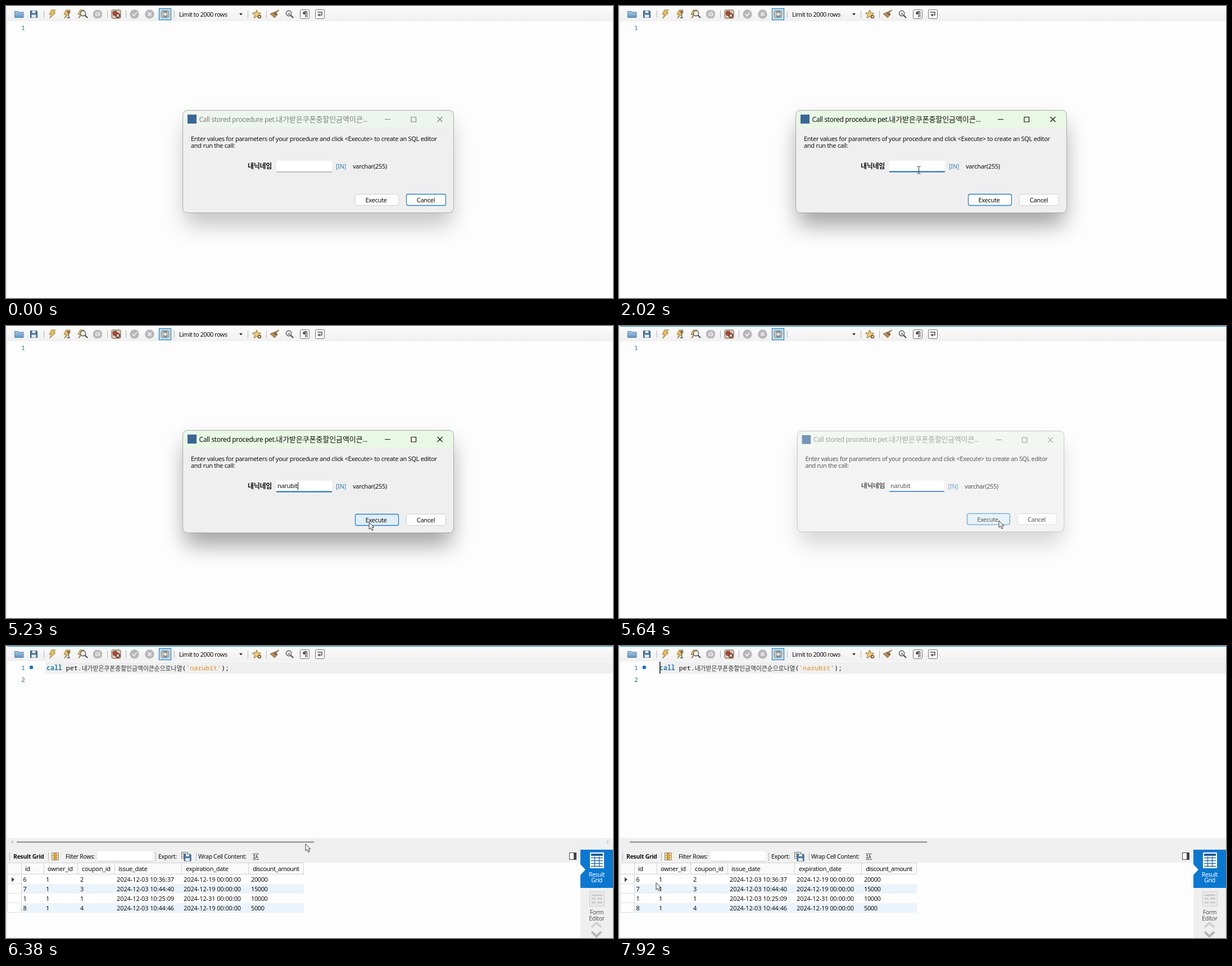
An HTML page that plays this animation: 1080x519 px, repeating every 7990 ms.

```html
<!DOCTYPE html>
<html lang="ko">
<head>
<meta charset="utf-8">
<title>Stored procedure call</title>
<style>
html, body { margin: 0; width: 100%; height: 100%; overflow: hidden; background: #fdfdfd; }
svg { display: block; width: 1080px; height: 519px; }
text { font: 11px "Noto Sans", "Noto Sans CJK KR", sans-serif; letter-spacing: -.3px; fill: #111; white-space: pre; }
.ko { font-family: "Noto Sans CJK KR", "Noto Sans CJK JP", sans-serif; }
.bar { font-size: 10.5px; letter-spacing: -.35px; }
.bold { font-weight: 700; }
.mid { text-anchor: middle; }
.mono, .mono tspan { font-family: "Noto Sans Mono", "Noto Sans CJK KR", monospace; font-size: 11.6px; letter-spacing: 0; }
.mono .ko { font-family: "Noto Sans CJK KR", sans-serif; font-size: 10.8px; fill: #333; }
.mono .word { fill: #287fae; }
.mono .str { fill: #dc8f1d; }
.row { fill: #2f6f9f; }
.num { letter-spacing: -.4px; }
.date { letter-spacing: -.1px; }
.sep { stroke: #b4b4b4; }
.line { fill: none; stroke: #555; }
</style>
</head>
<body>
<svg viewBox="0 0 1080 519">
  <defs>
    <linearGradient id="tool" x2="0" y2="1"><stop stop-color="#fcfcfc"/><stop offset="1" stop-color="#f0f0f0"/></linearGradient>
    <linearGradient id="blue" x2="0" y2="1"><stop stop-color="#a9cbe6"/><stop offset="1" stop-color="#5f93bd"/></linearGradient>
    <filter id="soft" x="-20%" y="-40%" width="140%" height="190%"><feGaussianBlur stdDeviation="19"/></filter>
    <path id="bolt" d="M5-7H-2L-6 1H-2L-5 8 5-2H1Z" fill="#efc15a" stroke="#8a6a35" stroke-width=".9"/>
    <g id="lens"><circle r="4.6" fill="#f4f4f4" stroke="#666" stroke-width="1.6"/><path d="M3.5 3.5 8 8" stroke="#555" stroke-width="2.4"/></g>
    <g id="disk"><path d="M-6-6H5L6-5V6H-6Z" fill="#47769f" stroke="#2f567a"/><path d="M-3-6H3V-2H-3ZM-4 1H4V6H-4Z" fill="#e6eef5"/></g>
    <rect id="key" x="-8" y="-8" width="16" height="16" rx="2" fill="#f7f7f7" stroke="#777"/>
  </defs>

  <rect width="2" height="519" fill="#ececec"/>
  <rect x="2" width="1078" height="27" fill="url(#tool)"/>
  <path id="focusLine" d="M2 .5H1080" stroke="#1583d2"/>
  <path class="sep" d="M67.5 8V21M180.5 8V21M213.5 8V21M299.5 8V21M430.5 8V21M463.5 8V21"/>
  <path d="M15.5 9.5H21L23 11H31V20.5H15.5Z" fill="url(#blue)" stroke="#5583a8"/>
  <use href="#disk" x="49.5" y="14.5"/>
  <use href="#bolt" x="83" y="14"/>
  <use href="#bolt" x="109" y="14"/><path d="M108 10H115M111.5 10V21M109 21H114" class="line" stroke-width="1.4"/>
  <use href="#bolt" x="134" y="14"/><use href="#lens" x="137" y="13"/>
  <path d="M159 7H167L171 11V18L167 22H159L155 18V11Z" fill="#b9b9b9"/><path d="M160 18V11M162.5 17V9.5M165 17V10M167 17V12M160 17H167" stroke="#e2e2e2" stroke-width="1.5"/>
  <rect x="188" y="7" width="16" height="15" rx="2" fill="#d8c9b4" stroke="#6e5c4d"/>
  <circle cx="194" cy="13" r="4" fill="#b54938" stroke="#703025"/><circle cx="199" cy="17" r="4.5" fill="#7e3c2b"/><path d="M197 15 201 19M201 15 197 19" stroke="#fff" stroke-width="1.3"/>
  <circle cx="228.5" cy="14.5" r="8.2" fill="#b7b7b7"/><path d="M225 14.5 228 17.5 232.5 11.5" fill="none" stroke="#f1f1f1" stroke-width="1.8"/>
  <circle cx="255.5" cy="14.5" r="8.2" fill="#b7b7b7"/><path d="M252.5 11.5 258.5 17.5M258.5 11.5 252.5 17.5" stroke="#f1f1f1" stroke-width="1.8"/>
  <rect x="272.5" y="4.5" width="21" height="20" fill="#cfe6f8" stroke="#2685cc" stroke-width="1.3"/>
  <rect x="276" y="8" width="14" height="13" rx="2" fill="#c9bfa9" stroke="#8b8374"/><path d="M280 12A4 4 0 0 1 287 12M287 17A4 4 0 0 1 280 17" fill="none" stroke="#4787bb" stroke-width="2"/><circle cx="283" cy="14.5" r="2" fill="#e8eef3"/>
  <text id="limit" x="308" y="18.5" style="letter-spacing:-.5px">Limit to 2000 rows</text>
  <path d="M415 13H421L418 16.5Z" fill="#222"/>
  <path d="M446 7 448.2 12 453.5 12.5 449.5 16 450.7 21.5 446 18.5 441.3 21.5 442.5 16 438.5 12.5 443.8 12Z" fill="#f3c66a" stroke="#8e7340"/><circle cx="451" cy="19" r="3.3" fill="#6d5330"/><path d="M449 19H453M451 17V21" stroke="#fff"/>
  <path d="M486 7 481 12 483 15 478 21 470 14 477 11Z" fill="#b88d56" stroke="#775637" stroke-width=".8"/><path d="M477 12 482 16" stroke="#5f5246" stroke-width="2"/>
  <use href="#lens" x="503" y="13"/><text class="mid" x="503.2" y="15.5" style="font-size:6px">A</text>
  <use href="#key" x="531.5" y="14.5"/><path d="M533 10V20M535.5 10V20M536 10H531" class="line" stroke-width="1.3"/><circle cx="530.5" cy="12.5" r="2.5" fill="#555"/>
  <use href="#key" x="558.5" y="14.5"/><path d="M554 11H562V16H556M558 14 555.5 16 558 18" class="line" stroke-width="1.5"/>

  <g id="code">
    <rect x="70" y="28" width="1010" height="21" fill="#efefef"/>
    <text class="mono" x="72" y="43"><tspan class="bold word">call</tspan> pet.<tspan class="ko" dy="1">내가받은쿠폰중할인금액이큰순으로나열</tspan><tspan dy="-1">(</tspan><tspan id="arg" class="str"></tspan>);</text>
    <text class="mono row" x="27" y="64">2</text>
  </g>
  <text class="mono row" x="27" y="43">1</text>
  <circle id="dot" cx="45" cy="38" r="3.2" fill="#1673c5"/>
  <path id="codeCaret" d="M73 28V49" stroke="#222" stroke-width="1.6"/>

  <g id="result">
    <rect x="2" y="341" width="1078" height="22" fill="#efefef"/>
    <rect x="2" y="362" width="1020" height="23" fill="#f0f0f0"/>
    <path d="M19 348.5H548" stroke="#858585" stroke-width="2"/>
    <path id="arrows" d="M13 345V351L8 348ZM1069 345V351L1074 348Z" fill="#cfcfcf"/>
    <path class="sep" d="M6.5 367V382M75.5 367V382M266.5 367V382M338.5 367V382"/>
    <text class="bar bold" x="13" y="378" style="letter-spacing:-.3px">Result Grid</text>
    <rect x="81.5" y="367.5" width="12" height="13" fill="#f6e3ad" stroke="#8d8d8d"/><path d="M85.5 367V381M89.5 367V381M81 372H94M81 376H94" stroke="#a78646"/><rect x="86" y="368" width="3" height="12" fill="#e5a530"/>
    <text class="bar" x="106" y="378">Filter Rows:</text>
    <rect x="163" y="365" width="98" height="18" fill="#fff"/><path d="M163 382.5H261" stroke="#c4c4c4"/>
    <text class="bar" x="271" y="378">Export:</text>
    <rect x="312.5" y="366.5" width="11" height="11" fill="#eee" stroke="#777"/><path d="M312 370H324M312 374H324M316.5 366V378" stroke="#888"/><use href="#disk" x="323" y="376"/>
    <text class="bar" x="342" y="378">Wrap Cell Content:</text>
    <path d="M439 369.5H450M439 379.5H450M441.5 371V378M440 373 441.5 371 443 373M440 376 441.5 378 443 376" class="line"/><text x="443.5" y="378" style="font-size:8px">A</text>
    <rect x="1002.5" y="367.5" width="12" height="12" fill="#fff" stroke="#444"/><rect x="1010" y="367" width="5" height="13" fill="#444"/>
    <g id="grid"></g>
    <path d="M10 411 15 415 10 419.5Z" fill="#444"/>
  </g>

  <g id="side">
    <rect x="1022" y="362" width="58" height="157" fill="#efefef"/>
    <rect x="1022" y="362" width="58" height="68" fill="#0a78d1"/>
    <path d="M1022 388 1031 397.5 1022 407Z" fill="#fdfdfd"/>
    <rect x="1039" y="367" width="25" height="28" fill="#fff"/><rect x="1041" y="369" width="21" height="4" fill="#235d91"/>
    <path d="M1041 376.5H1062M1041 381.5H1062M1041 386.5H1062M1041 391.5H1062M1047.5 374V393M1055.5 374V393" stroke="#2b6ca5" stroke-width="1.3"/>
    <g class="mid"><text class="bar" x="1051" y="410" style="fill:#fff">Result</text><text class="bar" x="1051" y="420" style="fill:#fff">Grid</text>
    <text class="bar" x="1051" y="477" style="fill:#555">Form</text><text class="bar" x="1051" y="488" style="fill:#555">Editor</text></g>
    <rect x="1038.5" y="436.5" width="26" height="26" fill="#e9e9e9" stroke="#d0d0d0"/><path d="M1042 443H1061M1042 449H1049M1052 449H1061M1042 456H1049M1052 456H1061" stroke="#c6c6c6" stroke-width="2.5"/>
    <path d="M1042 500 1050.5 492 1059 500" fill="none" stroke="#d2d2d2" stroke-width="4"/><path d="M1042 508 1050.5 516 1059 508" fill="none" stroke="#b5b5b5" stroke-width="4"/>
  </g>

  <g id="dialog">
    <rect id="shadow" x="318" y="208" width="475" height="182" rx="10" filter="url(#soft)"/>
    <rect x="314.5" y="185.5" width="482" height="182" rx="8" fill="#efefef"/>
    <path d="M315 216V194A8 8 0 0 1 323 186H788A8 8 0 0 1 796 194V216Z" fill="#eef5ee"/>
    <path id="green" d="M315 216V194A8 8 0 0 1 323 186H788A8 8 0 0 1 796 194V216Z" fill="#e9f8e5"/>
    <rect x="314.5" y="185.5" width="482" height="182" rx="8" fill="none" stroke="#aaa"/>
    <rect x="323" y="193" width="16" height="16" fill="#3a6797"/>
    <g id="title">
      <text x="343.5" y="205.5" style="font-size:12px;letter-spacing:-.35px">Call stored procedure pet.<tspan class="ko" style="font-size:13px;letter-spacing:-.1px">내가받은쿠폰중할인금액이큰</tspan>...</text>
      <path d="M674 201.5H684M721 197.5H729.5V206H721ZM767.5 197 776.5 206M776.5 197 767.5 206" fill="none" stroke="#111" stroke-width="1.2"/>
    </g>
    <text x="329" y="239.5">Enter values for parameters of your procedure and click &lt;Execute&gt; to create an SQL editor</text>
    <text x="329" y="252">and run the call:</text>
    <text class="ko bold" x="430" y="288.5" style="font-size:12px">내닉네임</text>
    <rect x="481" y="275" width="99" height="20" rx="2" fill="#fff"/>
    <rect id="under" x="481" width="99"/>
    <text id="typed" x="483" y="288"></text>
    <path id="caret" d="M0 277.5V291" stroke="#111"/>
    <text x="587" y="289" style="fill:#4480b4">[IN]</text>
    <text x="617" y="289">varchar(255)</text>
    <rect id="run" x="621.5" y="334.5" width="77" height="20" rx="3"/>
    <rect id="cancel" x="712.5" y="334.5" width="70" height="20" rx="3" fill="#fdfdfd"/>
    <text class="mid" x="658.5" y="349">Execute</text>
    <text class="mid" x="747" y="349">Cancel</text>
  </g>

  <g id="mouse">
    <path id="arrow" d="M0 0V12.2L2.8 9.6 5 14.5 7.2 13.5 5 8.8H8.8Z" fill="#fff" stroke="#222" stroke-width=".9"/>
    <path id="beam" d="M-3-6H-1L0-5 1-6H3M0-5V6M-3 7H-1L0 6 1 7H3" fill="none" stroke="#333"/>
  </g>
</svg>
<script>
const LOOP = 7990;
const NAME = "narubit";
const KEYS = [2430, 2820, 3350, 3480, 3740, 3820, 4000];
const COLS = [28, 68, 128, 194, 313, 432, 530];
const HEADS = ["id", "owner_id", "coupon_id", "issue_date", "expiration_date", "discount_amount"];
const HEAD_X = [34, 74, 135, 200, 320, 439];
const ROWS = [
  [6, 2, "03 10:36:37", 19, 20000],
  [7, 3, "03 10:44:40", 19, 15000],
  [1, 1, "03 10:25:09", 31, 10000],
  [8, 4, "03 10:44:46", 19, 5000]
];
// time, x, y
const PATH = [
  [300, 893, 514], [560, 755, 425], [820, 600, 325], [1080, 533, 291],
  [4820, 533, 291], [5060, 590, 322], [5300, 668, 360], [5580, 676, 346],
  [6180, 676, 346], [6400, 520, 353], [6640, 340, 374], [6850, 281, 387],
  [7200, 281, 387], [7500, 185, 403], [7760, 90, 418], [7920, 66, 421]
];

const $ = id => document.getElementById(id);
const clamp = v => Math.max(0, Math.min(1, v));
const show = (id, on) => $(id).setAttribute("visibility", on ? "visible" : "hidden");
const set = (id, attrs) => { for (const k in attrs) $(id).setAttribute(k, attrs[k]); };
const rect = (x, y, w, h, fill, extra = "") => `<rect x="${x}" y="${y}" width="${w}" height="${h}" fill="${fill}" ${extra}/>`;
const label = (x, y, s, cls = "", extra = "") => `<text x="${x}" y="${y}" class="${cls}" ${extra}>${s}</text>`;

function buildGrid() {
  let out = rect(2, 386, 528, 88, "#fff") + rect(3, 386, 527, 20, "#fafafa");
  out += rect(194, 386, 119, 19, "#d8ebf9", 'id="hover"');
  ROWS.forEach((_, i) => { if (i % 2) out += rect(28, 406 + 17 * i, 502, 17, "#ebf3fc"); });
  out += '<path d="M2 385.5H530M2 405.5H530" stroke="#d2d2d2"/>';
  out += '<path d="M3 422.5H28M3 439.5H28M3 456.5H28M3 473.5H28M2.5 386V474" stroke="#dedede"/>';
  out += `<path d="${COLS.map(x => `M${x - .5} 386V405`).join("")}M27.5 405V474" stroke="#d2d2d2"/>`;
  HEADS.forEach((h, i) => out += label(HEAD_X[i], 400, h, "", i === 5 ? 'style="letter-spacing:-.5px"' : ""));
  ROWS.forEach(([id, coupon, issued, day, amount], i) => {
    const y = 419 + 17 * i;
    out += label(30.5, y, id) + label(71, y, 1) + label(132, y, coupon);
    out += label(197, y, "2024-12-" + issued, "date") + label(316, y, `2024-12-${day} 00:00:00`, "date");
    out += label(436, y, amount, "num");
  });
  $("grid").innerHTML = out + rect(433, 457, 97, 17, "#e7e7e7", 'id="pending"');
}

function mouseAt(t) {
  const i = PATH.findIndex(p => p[0] > t);
  if (i < 0) return PATH[PATH.length - 1].slice(1);
  if (!i) return PATH[0].slice(1);
  const a = PATH[i - 1], b = PATH[i], u = (t - a[0]) / (b[0] - a[0]);
  return [a[1] + (b[1] - a[1]) * u, a[2] + (b[2] - a[2]) * u];
}

const inside = (x, y, l, t, r, b) => x >= l && x <= r && y >= t && y <= b;

function drawDialog(t, x, y) {
  const gone = t < 5640 ? 0 : t < 5710 ? .43 : t < 5770 ? .85 : 1;
  const active = gone ? 0 : clamp((t - 1160) / 140);
  const focus = t >= 1160;
  show("dialog", gone < 1);
  const s = 1 - .035 * gone;
  set("dialog", { opacity: 1 - gone ** 1.4, transform: `translate(487 260) scale(${s}) translate(-487 -260)` });
  set("shadow", { opacity: gone ? .22 : .22 + .13 * clamp((t - 1080) / 140) });
  set("green", { opacity: active });
  set("title", { opacity: .5 + .5 * active });
  set("under", focus ? { y: 293.5, height: 2, fill: "#1069b8" } : { y: 294.5, height: 1, fill: "#8a8a8a" });
  const over = t > 4820 && inside(x, y, 621, 334, 699, 355);
  set("run", { fill: over ? "#e0eef9" : "#fdfdfd", stroke: focus ? "#2a83c6" : "#d0d0d0", "stroke-width": focus ? 1.3 : 1 });
  set("cancel", { stroke: focus ? "#d0d0d0" : "#2a83c6", "stroke-width": focus ? 1 : 1.3 });

  const count = KEYS.filter(k => k <= t).length;
  $("typed").textContent = NAME.slice(0, count);
  const end = 483.5 + (count ? $("typed").getComputedTextLength() : 0);
  set("caret", { transform: `translate(${Math.floor(end) + .5} 0)` });
  const on = (t >= 1490 && t < 2020) || (t >= 2430 && t < 4550) || (t >= 5080 && t < 5610);
  $("caret").style.display = on ? "" : "none";
}

function draw(t) {
  const [x, y] = mouseAt(t);
  drawDialog(t, x, y);

  show("focusLine", t >= 5640);
  show("limit", t < 5640 || t >= 5770);
  show("code", t >= 5770);
  show("dot", t >= 5980);
  show("codeCaret", t >= 5800 && Math.floor((t - 5800) / 530) % 2 === 0);
  $("result").style.display = t >= 5840 ? "" : "none";
  show("side", t >= 5980);
  show("pending", t < 5980);
  set("arrows", { opacity: clamp((t - 6180) / 140) * clamp((7060 - t) / 120) });

  const col = y >= 386 && y <= 405 ? COLS.findIndex((c, i) => x >= c && x < COLS[i + 1]) : -1;
  show("hover", col >= 0);
  if (col >= 0) set("hover", { x: COLS[col], width: COLS[col + 1] - COLS[col] });

  const beam = t < 5640 ? inside(x, y, 481, 275, 580, 296) : t >= 5710 && t < 6180;
  $("mouse").style.display = t >= 300 && (t < 2490 || t >= 4820) ? "" : "none";
  set("mouse", { transform: `translate(${Math.round(x) + (beam ? .5 : 0)} ${Math.round(y)})` });
  show("arrow", !beam);
  show("beam", beam);
}

$("arg").textContent = `'${NAME}'`;
buildGrid();

const start = performance.now();
function tick() {
  draw((performance.now() - start) % LOOP);
  requestAnimationFrame(tick);
}
tick();
</script>
</body>
</html>
```
